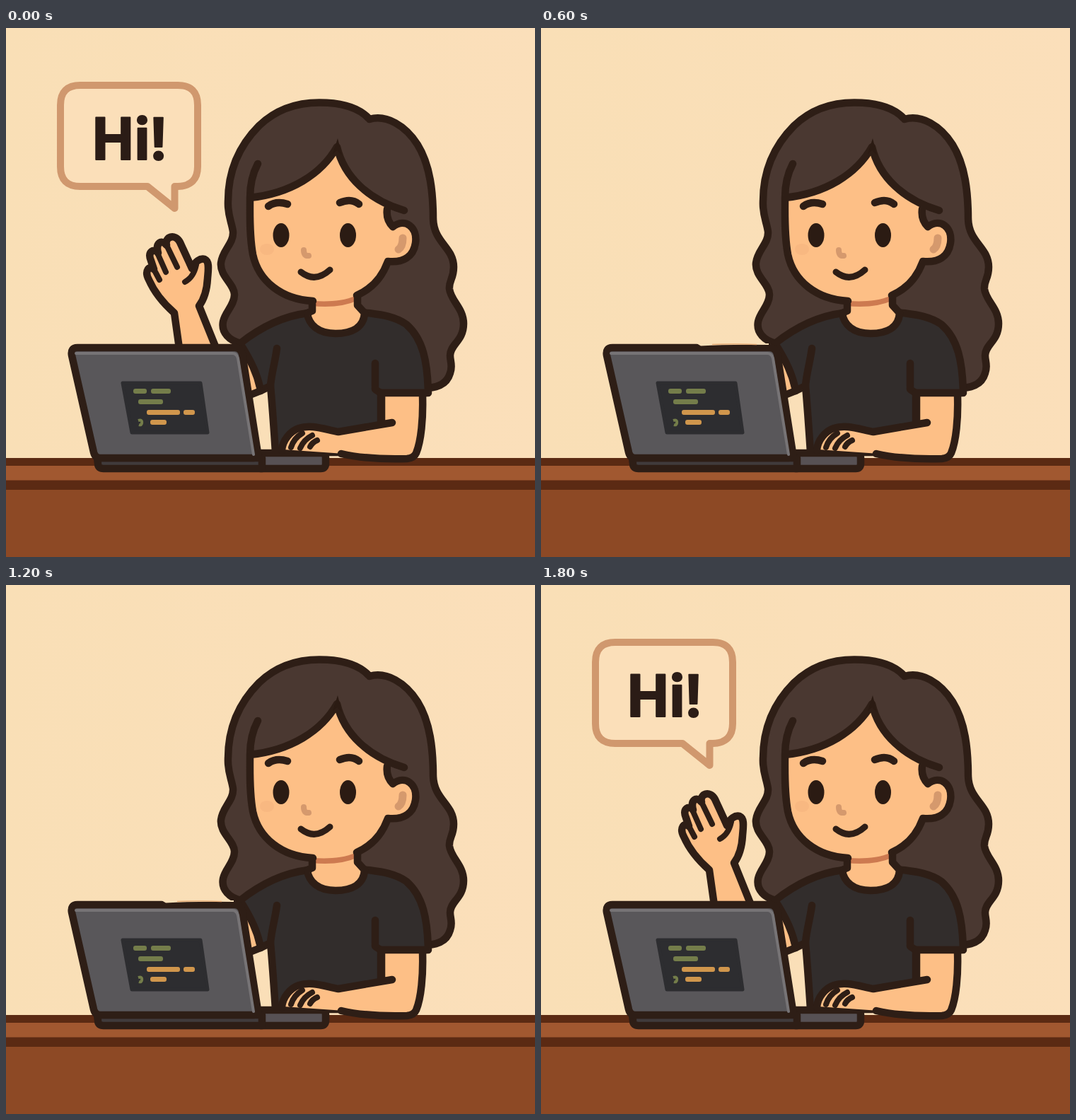
These frames come from a looping animation (748x748 px, 1900 ms). An HTML page:

```html
<!DOCTYPE html>
<html lang="en">
<head>
<meta charset="utf-8">
<title>Hi!</title>
<style>
  html, body { margin: 0; width: 100%; height: 100%; overflow: hidden; background: #fadfb8; }
  svg { display: block; width: 100%; height: 100%; }
  .ink { stroke: #2e1e16; stroke-width: 10.5; stroke-linecap: round; stroke-linejoin: round; fill: none; }
  .thin { stroke-width: 8; }
  .skin { fill: #fdbf86; }
  .hair { fill: #4a3831; }
  .shirt { fill: #322d2c; }
  .dark { fill: #2b1b13; }
  .tan { stroke: #d5996d; stroke-linecap: round; fill: none; }
  .green { fill: #747d4a; }
  .amber { fill: #d0964c; }
  text { font: 700 83px Roboto, sans-serif; letter-spacing: .7px; fill: #2b1c16; stroke: #2b1c16; stroke-width: 2; stroke-linejoin: round; }
</style>
</head>
<body>
<svg viewBox="0 0 748 748">
  <defs>
    <linearGradient id="wall">
      <stop offset="0" stop-color="#f9dfb6"/>
      <stop offset="1" stop-color="#fbdfba"/>
    </linearGradient>
  </defs>
  <rect width="748" height="748" fill="url(#wall)"/>

  <!-- desk -->
  <rect y="608" width="748" height="140" fill="#5b2a13"/>
  <rect y="619" width="748" height="20.500" fill="#a15830"/>
  <rect y="653" width="748" height="95" fill="#8d4925"/>

  <!-- speech bubble and raised arm -->
  <g id="wave">
    <path d="M105 81H243Q271 81 271 109V196Q271 223 243 224H238.500V255L200 224H105Q77 224 77 196V109Q77 81 105 81Z"
      fill="#fbdfb9" stroke="#d0986e" stroke-width="10" stroke-linejoin="round"/>
    <text x="122" y="186">Hi!</text>
    <path class="skin" d="M246 460L238 403C221 388 209 372 202 356C195 343 203 335 209 341L205 329C199 316 210 311 215 318C211 304 220 298 227 307C224 295 239 290 246 303L263 340C267 330 275 325 281 327C288 330 286 342 285 354C284 373 279 385 273 393L300 460Z"/>
    <path class="ink" d="M246 460L238 403C221 388 209 372 202 356C195 343 203 335 209 341L205 329C199 316 210 311 215 318C211 304 220 298 227 307C224 295 239 290 246 303L263 340C267 330 275 325 281 327C288 330 286 342 285 354C284 373 279 385 273 393L300 460"/>
    <path class="ink thin" d="M209 341L217 356M214 318L226 345M227 307L242 338M269 335Q265 353 253 359"/>
  </g>

  <!-- hair behind -->
  <path class="ink" style="fill:#4a3831" d="M332 446C316 442 304 431 307 415C310 401 323 392 323 377C323 362 302 351 304 332C306 314 322 305 321 288C319 274 313 264 314 245C314 200 331 165 358 138C381 116 411 105.500 443 105.500C475 105.500 500 113 514 129C538 122 565 138 582 165C600 194 604 232 604 270C605 304 633 310 633 338C633 355 626 357 627 369C629 386 647 396 647 418C647 443 628 447 628 463C628 472 632 477 628 488C624 502 612 508 597 509Z"/>

  <!-- torso -->
  <path class="skin" d="M332 450L361 512L344 519Z"/>
  <path class="ink" style="fill:#322d2c" d="M427 403C386 408 355 427 331 446C346 470 356 490 360 513L374 506C377 540 379 570 381 600H530V516L597 516C596 472 590 440 566 419C547 406 525 405 505 402Z"/>
  <path class="ink" d="M383 453C380 475 375 490 374 506M345 519L360 513M522 474V511L531 517"/>

  <!-- neck -->
  <path class="skin" d="M433 378H496V392L507 403C506 424 488 432 466 432C442 432 428 420 426 403L434 400Z"/>
  <path d="M432 390C452 392 478 391 497 382V375H425Z" fill="#cd7a50" stroke="#cd7a50" stroke-width="6"/>
  <path class="ink" d="M497 381V392L507 403C506 424 488 432 466 432C442 432 428 420 426 403L433 400V390"/>

  <!-- head -->
  <path class="skin" d="M345 240C402 234 446 207 468 168C478 211 508 238 540 252V276C568 268 584 282 580 304C577 324 561 333 540 330C532 352 517 369 496 378C475 387 455 387 434 386C390 384 357 358 349 320C344 292 345 265 345 240Z"/>
  <path class="hair" d="M538 250L562 259L556 275L546 280Q538 272 538 250Z"/>
  <path class="ink" d="M356 192C348 207 345 222 345 240C345 265 344 292 349 320C357 358 390 384 434 386M345 240C402 234 446 207 468 168C478 211 513 243 563 258M539 256Q537 271 547 281C565 268 582 282 579 304C576 324 561 332 540 330C532 352 517 369 496 378"/>
  <path class="dark" d="M469 156L462 178L468 173L475 180Z"/>
  <path class="tan" stroke-width="11" d="M561 297Q561 309 555 313"/>
  <ellipse cx="369" cy="313" rx="10" ry="8" fill="#eda676" opacity=".28"/>
  <path class="tan" stroke-width="8" d="M421 314Q421 323 428 322"/>
  <ellipse class="dark" cx="389" cy="293" rx="11.500" ry="17"/>
  <ellipse class="dark" cx="483.500" cy="293" rx="11.500" ry="17"/>
  <path class="ink" d="M371 252Q382 244 398 249M472 247Q488 240 499 249"/>
  <path class="ink" style="stroke-width:9" d="M417 345Q437 361 458 342"/>

  <!-- laptop -->
  <path class="ink" style="fill:#575154" d="M360 601H445Q452 601 452 607V616Q452 623 445 623H360Z"/>
  <path class="ink" style="fill:#403b3c" d="M129 608H362V623H138Q130 623 130 616Z"/>
  <path class="ink" style="fill:#59575a" d="M101 452H323Q332 452 334 461L356 601Q357 608 350 608H133Q126 608 124 600L93 463Q91 452 101 452Z"/>
  <path d="M99 460H320Q326 460 328 467L350 603" fill="none" stroke="#777476" stroke-width="4" stroke-linecap="round"/>
  <path d="M165 502H275L285 572H178Z" fill="#2d2d30" stroke="#2d2d30" stroke-width="5" stroke-linejoin="round"/>
  <g id="code"></g>
  <path d="M187 555Q193 553 192 559Q191 562 188 561" fill="none" stroke="#747d4a" stroke-width="4"/>
  <g id="rest">
    <path d="M220 446H322V448Q270 447 226 449.500Z" fill="#f9dfb8"/>
    <path d="M242 447.500Q275 446 305 447.500" fill="none" stroke="#e7ae79" stroke-width="1.500"/>
  </g>

  <!-- resting arm -->
  <path class="skin" d="M531 518H590C591 555 588 586 579 606C550 611 503 610 478 602L392 596C392 583 402 570 414 566C431 560 449 567 470 571L531 560Z"/>
  <path class="ink" d="M530 516H594M531 518V556M589 520C590 552 587 584 580 601Q577 608 567 609C530 610 500 608 474 602M390 597C391 583 402 570 414 566C431 560 449 567 470 571L546 558"/>
  <path class="ink thin" d="M403 593Q407 580 419 573M416 594Q421 582 433 576M430 592Q433 586 440 583"/>
</svg>
<script>
  const $ = id => document.getElementById(id);
  const LOOP = 1900, WAVE_END = 200, WAVE_START = 1800;

  // x, y, width, colour
  const bars = [
    [180, 510, 19, "green"], [205, 510, 28, "green"], [187, 525, 35, "green"],
    [199, 540, 47, "amber"], [251, 540, 16, "amber"], [204, 554, 23, "amber"]
  ];
  $("code").innerHTML = bars.map(([x, y, w, c]) =>
    `<rect class="${c}" x="${x}" y="${y}" width="${w}" height="7" rx="3"/>`).join("");

  function draw(ms) {
    const t = ms % LOOP;
    const waving = t < WAVE_END || t >= WAVE_START;
    $("wave").style.display = waving ? "" : "none";
    $("rest").style.display = waving ? "none" : "";
  }

  const start = performance.now();
  function tick() {
    draw(performance.now() - start);
    requestAnimationFrame(tick);
  }
  draw(0);
  requestAnimationFrame(tick);
</script>
</body>
</html>
```
